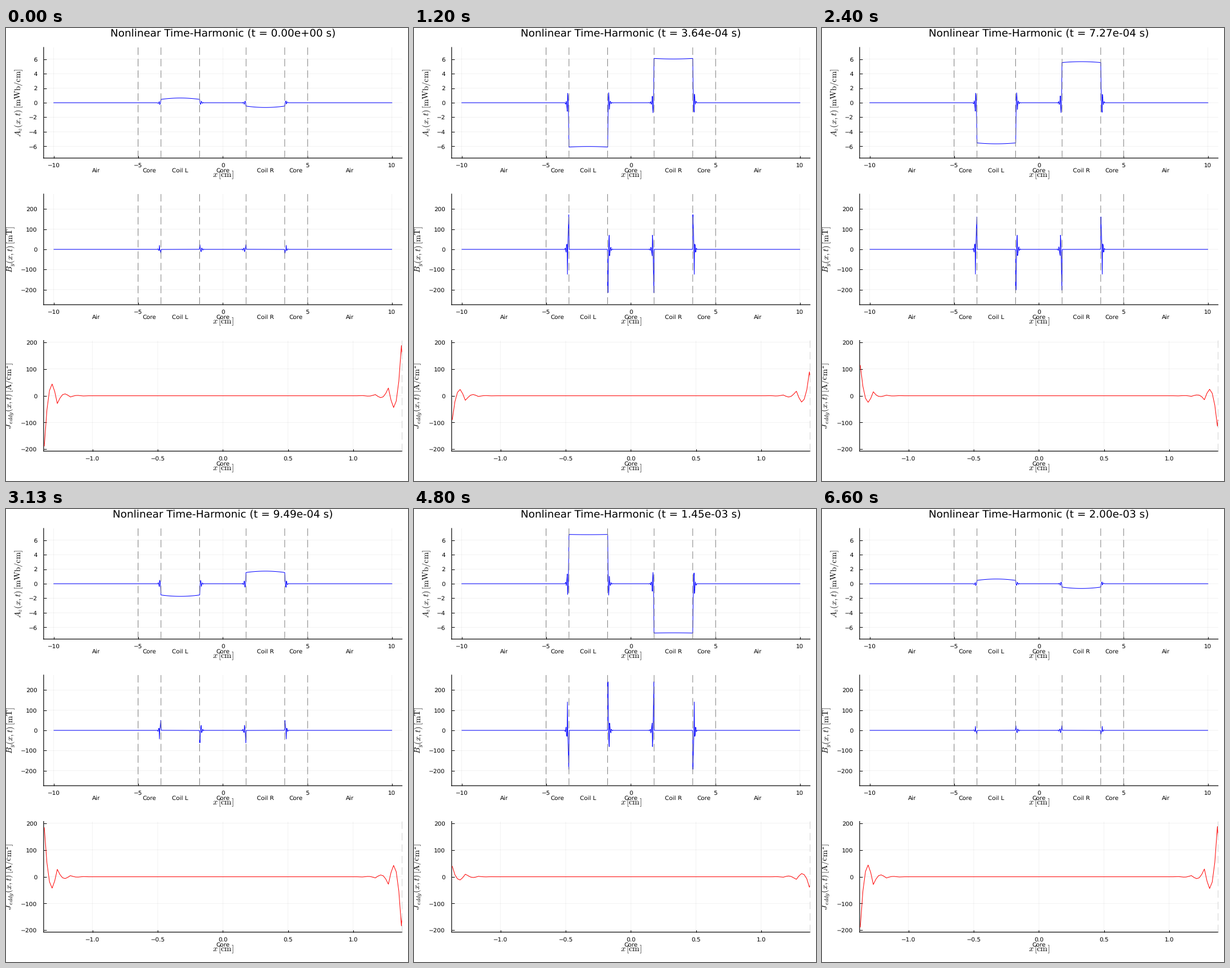
Animation of 705 by 794 pixels, one loop 6670 ms. Source, as a matplotlib script:

```python
import numpy as np
import matplotlib.pyplot as plt
from matplotlib.animation import FuncAnimation

W, H = 705, 794
FRAMES, INTERVAL = 230, 29  # one loop is 6670 ms
STATES, STATE_MS = 100, 66.6
PERIOD = 2e-3
PX = 0.72  # points per pixel at 100 dpi

plt.rcParams.update({
    "font.family": "DejaVu Sans",
    "mathtext.fontset": "cm",
    "text.hinting": "none",
    "path.simplify": False,
    "path.snap": False,
})

LEFT, RIGHT, HEIGHT = 66, 694.6, 194
MID = (LEFT + RIGHT) / 2
SMALL, LABEL, TITLE = 10.4 * PX, 14.6 * PX, 18.35 * PX

# Geometry in cm
R1, R2, R3, STEP = 1.37, 3.66, 5.015, 0.02
EDGES = [-R3, -R2, -1.375, 1.375, R2, R3]
REGIONS = ["Air", "Core", "Coil L", "Core", "Coil R", "Core", "Air"]

# Complex amplitudes: value = re * cos(wt) + im * sin(wt)
K = 27.2
J_SKIN = np.array([
    -188 - 12.5j, -54, 20 + 5j, 44 + 5.8j, 16 + 1j, -29 - 5.4j, -9 - 3j,
    4 + 0.5j, 7 + 2j, 2.5 + 1j, -4.5 - 1j, -1.5 - 0.5j, 1, 1.3 + 0.3j,
    0.2, -0.8, -0.4])
B_SKIN = np.array([
    -18 + 197j, -11 + 133j, -4 + 75j, -2 + 17j, 20 - 145j, -5 + 30j,
    -5 + 30j, -3 + 22j, 2 - 16j, 2 - 8j, 1 + 6j, 3j])


def build_field():
    """Mesh and potential over the whole section, odd about x = 0."""
    r_core = np.arange(0.01, R1 + 1e-6, STEP)
    core = np.zeros(len(r_core), complex)
    core[-len(J_SKIN):] = (1j * J_SKIN / K)[::-1]

    edge = core[-1]
    r_coil = np.linspace(R1, R2, 80)[1:-1]
    s = (2 * r_coil - R1 - R2) / (R2 - R1)
    coil = edge + 0.19 * (1 - s ** 2)

    r_out = np.append(np.arange(R2, 10, STEP), 10)
    out = np.zeros(len(r_out), complex)
    n = len(B_SKIN)
    out[:n] = edge + STEP * np.append(0, np.cumsum(B_SKIN)[:-1])

    r = np.concatenate([r_core, r_coil, r_out])
    a = np.concatenate([core, coil, out])
    return np.append(-r[::-1], r), np.append(a[::-1], -a)


x, A = build_field()
B = -np.diff(A) / np.diff(x)
x_mid = (x[1:] + x[:-1]) / 2
inside = np.abs(x) < R1 + 1e-6
x_core = np.append(x[inside], 1.375)
J = -1j * K * A[inside]
J = np.append(J, 0.8 * J[-1])

fig = plt.figure(figsize=(W / 100, H / 100), dpi=100, facecolor="white")


def put(px, py, text, size, **kw):
    kw = {"ha": "center", "va": "baseline", **kw}
    return fig.text(px / W, 1 - py / H, text, fontsize=size, **kw)


def num(v, digits=0):
    return f"{v:.{digits}f}".replace("-", "\u2212")


def panel(top, xmax, ymax, xticks, yticks, ylabel, label_x, color,
          walls, wall_color, regions, digits=0):
    bottom = top + HEIGHT
    ax = fig.add_axes([LEFT / W, 1 - bottom / H, (RIGHT - LEFT) / W, HEIGHT / H])
    ax.set(xlim=(-xmax, xmax), ylim=(-ymax, ymax), facecolor="none")
    ax.set_xticks(xticks, labels=[])
    ax.set_yticks(yticks, labels=[])
    ax.tick_params(direction="in", length=4.5 * PX, width=PX)
    ax.grid(color="black", alpha=0.1, linewidth=0.5 * PX)
    ax.set_axisbelow(True)
    for side in ("top", "right"):
        ax.spines[side].set_visible(False)
    for side in ("left", "bottom"):
        ax.spines[side].set_linewidth(1.2 * PX)

    def to_px(v):
        return MID + v / xmax * (RIGHT - LEFT) / 2

    for v in xticks:
        put(to_px(v), bottom + 16.3, num(v, digits), SMALL)
    for v in yticks:
        put(54.8, top + HEIGHT / 2 * (1 - v / ymax) + 3.9, num(v), SMALL, ha="right")
    for v, name in regions:
        put(to_px(v), bottom + 25, name, SMALL)
    put(MID, bottom + 33.3, r"$x\,\mathrm{[cm]}$", LABEL)
    put(label_x, top + HEIGHT / 2, ylabel, LABEL, rotation=90, rotation_mode="anchor")

    line, = ax.plot([], [], color=color, linewidth=PX, zorder=3)
    for v in walls:
        ax.plot([v, v], [-ymax, ymax], color=wall_color, linewidth=PX, zorder=4,
                dashes=(13, 7.1), dash_capstyle="butt", clip_on=False)
    return line


bounds = [-10, *EDGES, 10]
regions = [((a + b) / 2, s) for a, b, s in zip(bounds, bounds[1:], REGIONS)]
wide = [-10, -5, 0, 5, 10]

a_line = panel(34, 10.6, 7.61, wide, range(-6, 7, 2),
               r"$A_z(x,t)\,\mathrm{[mWb/cm]}$", 26.5, "blue",
               EDGES, "gray", regions)
b_line = panel(291, 10.6, 274, wide, range(-200, 201, 100),
               r"$B_y(x,t)\,\mathrm{[mT]}$", 12.5, "blue",
               EDGES, "gray", regions)
j_line = panel(547.6, 1.375, 207, [-1, -0.5, 0, 0.5, 1], range(-200, 201, 100),
               r"$J_{\,eddy}(x,t)\,\mathrm{[A/cm^2]}$", 10.5, "red",
               [1.375], "lightgray", [(0, "Core")], digits=1)
title = put(MID, 16, "", TITLE)


def update(i):
    # The solution advances in discrete states, each held for a few frames
    state = min(int((i + 1) * INTERVAL / STATE_MS), STATES - 1)
    t = PERIOD * state / (STATES - 1)
    w = 2 * np.pi * t / PERIOD
    for line, xs, amp in ((a_line, x, A), (b_line, x_mid, B), (j_line, x_core, J)):
        line.set_data(xs, amp.real * np.cos(w) + amp.imag * np.sin(w))
    title.set_text(f"Nonlinear Time-Harmonic (t = {t:.2e} s)")
    return a_line, b_line, j_line, title


anim = FuncAnimation(fig, update, frames=FRAMES, interval=INTERVAL,
                     repeat=True, repeat_delay=0, blit=False)
plt.show()
```
